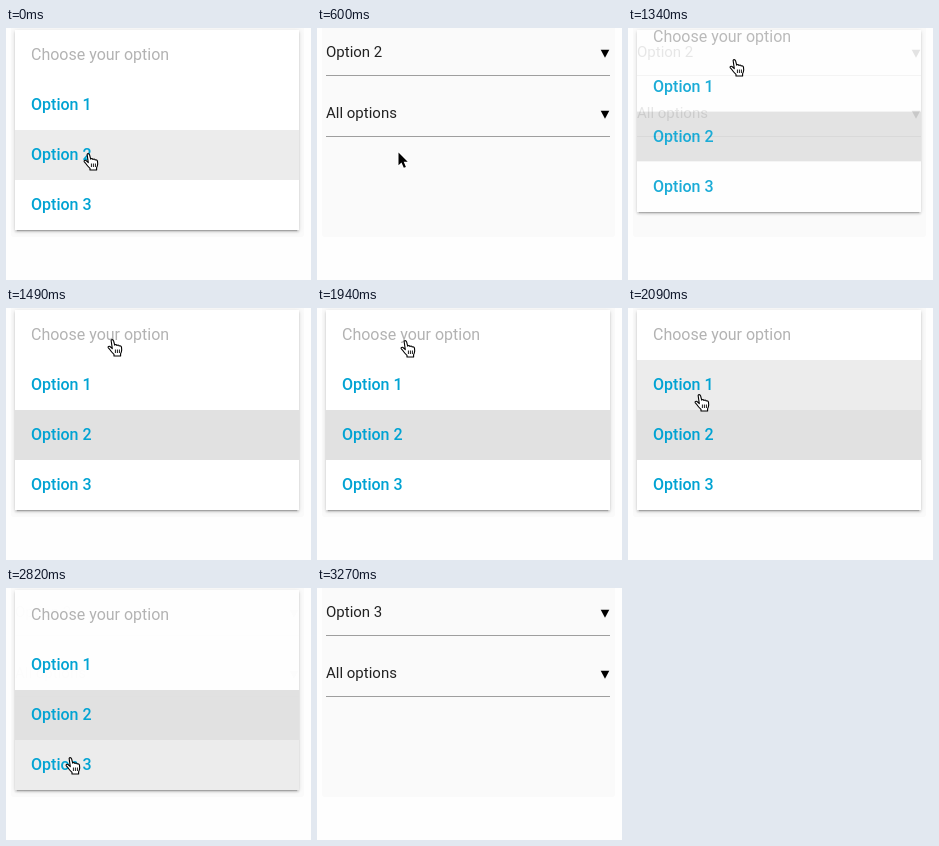
An HTML page for the animation above (4770 ms loop, 305 px wide and 252 px high).

```html
<!DOCTYPE html>
<html lang="en">
<head>
<meta charset="utf-8">
<title>Select menu</title>
<style>
  html, body { margin: 0; width: 100%; height: 100%; overflow: hidden; background: #fefefe; }
  body { position: relative; font-family: Roboto, sans-serif; }
  .panel { position: absolute; left: 5px; top: -4px; width: 293px; height: 213px; border-radius: 3px; background: #fafafa; }
  .field { position: absolute; left: 9px; width: 284px; height: 32px; border-bottom: 1px solid #9e9e9e; font-size: 15px; line-height: 18px; color: rgba(0, 0, 0, .87); white-space: nowrap; }
  .field svg { position: absolute; right: 0; top: 6px; }
  .menu {
    position: absolute; left: 9px; top: 2px; width: 284px; height: 200px; overflow: hidden; background: #fff;
    box-shadow: 0 2px 2px rgba(0, 0, 0, .14), 0 1px 5px rgba(0, 0, 0, .12), 0 3px 1px -2px rgba(0, 0, 0, .2);
  }
  .row { height: 22px; padding: 14px 16px; font-size: 16px; line-height: 22px; font-weight: 500; color: #00a3d3; white-space: nowrap; }
  .row:first-child { color: #b3b3b3; font-weight: 400; }
  .cursor { position: absolute; left: 0; top: 0; overflow: visible; }
</style>
</head>
<body>
<div class="panel"></div>
<div class="field" style="top:15px"><span id="value">Option 2</span><svg width="10" height="9"><path d="M.7 .7H9.3L5 8.7Z"/></svg></div>
<div class="field" style="top:76px">All options<svg width="10" height="9"><path d="M.7 .7H9.3L5 8.7Z"/></svg></div>
<div class="menu" id="menu">
  <div id="list">
    <div class="row">Choose your option</div>
    <div class="row">Option 1</div>
    <div class="row">Option 2</div>
    <div class="row">Option 3</div>
  </div>
</div>
<svg class="cursor" id="hand" width="16" height="18">
  <path fill="#fff" stroke="#000" stroke-width="1.1" stroke-linejoin="round" d="M4.2 2Q4 .6 5.1 .6Q6.2 .6 6.6 1.9L7.7 6.2Q8.8 4.8 9.9 6.5Q11.3 5.4 12.2 7Q13.8 6.3 14.5 8.2L14.7 11Q14.5 13.2 13.6 14.8V17H7V15.3Q4.4 13 2.4 10Q.5 8.5 1.2 7.6Q2.2 6.6 3.6 8L5.3 9.6Z"/>
  <path stroke="#000" stroke-width=".9" d="M8.4 10.5V14M10.4 10.5V14M12.4 10.5V14"/>
</svg>
<svg class="cursor" id="arrow" width="12" height="18">
  <path fill="#000" stroke="#fff" stroke-width="1.8" stroke-linejoin="round" paint-order="stroke" d="M1.5 1.5V14.3L4.5 11.5L6.8 16.8L8.9 15.9L6.7 10.7H10.7Z"/>
</svg>
<script>
const LOOP = 4770, ROW = 50, FULL = 200;
const $ = id => document.getElementById(id);
const rows = [...document.querySelectorAll('.row')];
const clamp = x => Math.max(0, Math.min(1, x));

const ticks = [0, 150, 300, 450, 600, 750, 900, 1050, 1190, 1340, 1490, 1640, 1790, 1940,
  2090, 2230, 2380, 2530, 2820, 2970, 3120, 3270];

// Pointer path: time, x, y, shape.
const path = [
  [0, 77, 125, 'hand'], [150, 77, 126, 'hand'], [600, 80, 123, 'arrow'],
  [750, 87, 72, 'hand'], [900, 95, 45, 'hand'], [1050, 101, 31, 'hand'],
  [1640, 96, 34, 'hand'], [1790, 85, 34, 'hand'], [1940, 83, 32, 'hand'],
  [2090, 66, 86, 'hand'], [2230, 59, 154, 'hand'], [2380, 59, 168, 'hand'],
  [2530, 59, 169, 'hand'], [3120, 62, 168, 'arrow'], [3270, 0, 0, 'none']
];

const fadeOut = (t, start) => .5 + Math.cos(Math.PI * clamp((t - start) / 225)) / 2;
const lastAt = (list, t, key) => list.filter(e => key(e) <= t).pop();

function menuState(t) {
  if (t < 1131) return { height: FULL, opacity: fadeOut(t, 270) };
  const p = clamp((t - 1131) / 300);
  return {
    height: FULL * (1 - (1 - p) ** 2),
    opacity: Math.sin(p * Math.PI / 2) * fadeOut(t, 2805)
  };
}

function rowStates(t) {
  const selected = t < 300 ? 0 : t < 2970 ? 2 : 3;
  const hovered = t < 300 ? 2 : t < 2090 ? 0 : t < 2230 ? 1 : 3;
  return { selected, hovered };
}

function draw(t) {
  const { height, opacity } = menuState(t);
  const { selected, hovered } = rowStates(t);
  const scroll = t < 1131 ? 0 : Math.min(2 * ROW, FULL - height);
  $('menu').style.height = height + 'px';
  $('menu').style.opacity = opacity;
  $('menu').style.visibility = opacity > 0 ? 'visible' : 'hidden';
  $('list').style.transform = `translateY(${-scroll}px)`;
  rows.forEach((row, i) => {
    row.style.background = i && i === selected ? '#e1e1e1' : i && i === hovered ? '#ececec' : '#fff';
  });
  $('value').textContent = t < 2970 ? 'Option 2' : 'Option 3';

  const [, x, y, shape] = lastAt(path, t, e => e[0]);
  for (const id of ['hand', 'arrow']) {
    $(id).style.display = id === shape ? 'block' : 'none';
    $(id).style.transform = `translate(${x}px, ${y}px)`;
  }
}

const begin = performance.now();
function frame() {
  draw(lastAt(ticks, (performance.now() - begin) % LOOP, e => e));
  requestAnimationFrame(frame);
}
frame();
</script>
</body>
</html>
```
